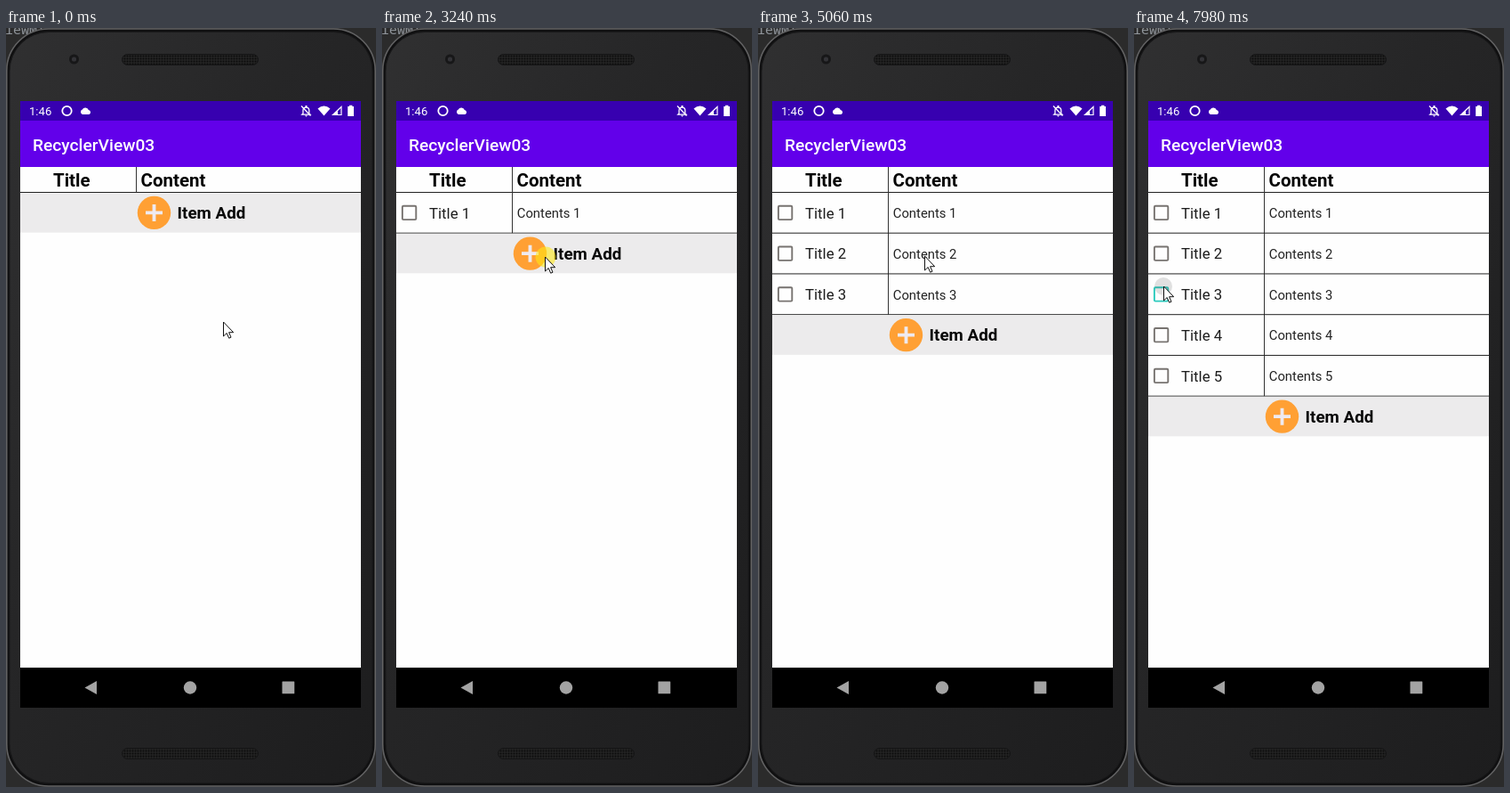
Animation of 416 by 852 pixels, one loop 8000 ms. Source, as an HTML page:

```html
<!DOCTYPE html>
<html lang="en">
<head>
<meta charset="utf-8">
<title>RecyclerView03</title>
<style>
  html, body { margin: 0; width: 100%; height: 100%; overflow: hidden; background: #2b2b2b; }
  svg { display: block; width: 100vw; height: 100vh; font-family: Roboto, sans-serif; }
</style>
</head>
<body>
<svg viewBox="0 0 416 852">
  <defs>
    <linearGradient id="shell" x1="0" y1="0" x2="1" y2="1">
      <stop offset="0" stop-color="#303031"/>
      <stop offset=".4" stop-color="#262627"/>
      <stop offset="1" stop-color="#1d1d1e"/>
    </linearGradient>
    <pattern id="mesh" width="3" height="3" patternUnits="userSpaceOnUse">
      <rect width="3" height="3" fill="#222"/>
      <circle cx="1.5" cy="1.5" r="1" fill="#0c0c0c"/>
    </pattern>
  </defs>

  <rect width="416" height="852" fill="#2b2b2b"/>
  <text x="-1" y="7" font-size="15" fill="#8f949a" font-family="Noto Sans Mono, monospace">iewM:</text>

  <rect x=".8" y="1" width="414.4" height="850" rx="47" fill="#101011" stroke="#626263" stroke-width="1.6"/>
  <rect x="4" y="4.5" width="408" height="843" rx="44" fill="url(#shell)" stroke="#19191a"/>
  <circle cx="76.5" cy="35" r="5.5" fill="#171718"/>
  <circle cx="76.5" cy="35" r="2.6" fill="#333337"/>
  <g fill="url(#mesh)" stroke="#151516">
    <rect x="130.5" y="29.5" width="153" height="12" rx="6"/>
    <rect x="130.5" y="808.5" width="153" height="12" rx="6"/>
  </g>

  <rect x="16" y="82" width="383" height="681" fill="#fefefe"/>
  <rect x="16" y="82" width="383" height="22" fill="#3700b0"/>
  <rect x="16" y="104" width="383" height="52" fill="#6200ea"/>

  <g fill="#fff">
    <text x="26" y="98" font-size="13.1">1:46</text>
    <circle cx="68.5" cy="93" r="5.2" fill="none" stroke="#fff" stroke-width="1.8"/>
    <path d="M86 97a3 3 0 0 1-.2-5.6 3.9 3.9 0 0 1 7 .6 2.6 2.6 0 0 1 .6 5Z"/>
    <path d="M334 96v-3.5a3.4 3.4 0 0 1 6.8 0V96l1.2 1.2h-9.2Z" fill="none" stroke="#fff" stroke-width="1.3"/>
    <path d="M332 87.500l10.500 11" stroke="#fff" stroke-width="1.3"/>
    <path d="M336 98.300h3l-1.500 1.400ZM336.500 87h2v2.500h-2Z"/>
    <path d="M350.500 90.500q7-6 14 0l-7 8Z"/>
    <path d="M377 88.500v9h-9.500Z" fill="none" stroke="#fff" stroke-width="1.2"/>
    <path d="M373 92.500v5.500h-6Z"/>
    <path d="M386 86.700h3.400v1.300h1.600v11h-6.800v-11h1.800Z"/>
    <text x="30" y="137.500" font-size="19.2" font-weight="500">RecyclerView03</text>
  </g>

  <g font-size="20.5" font-weight="700" fill="#050505">
    <text x="53" y="178">Title</text>
    <text x="151.500" y="178">Content</text>
  </g>
  <path d="M16 184.500H399" stroke="#222"/>
  <path id="divider" stroke="#333"/>
  <g id="rows"></g>

  <g id="add">
    <rect x="16" y="185" width="383" height="44.6" fill="#ecebec"/>
    <circle cx="166.500" cy="207.400" r="18.700" fill="#ffa034"/>
    <path d="M157 207.400h19M166.500 197.900v19" stroke="#efeaf0" stroke-width="3.800"/>
    <text x="192.600" y="214.200" font-size="18.800" font-weight="700" fill="#080808">Item Add</text>
  </g>

  <rect x="16" y="718" width="383" height="45"/>
  <g fill="#a3a3a3">
    <path d="M88.500 740.500L102 733v15Z"/>
    <circle cx="207" cy="740.500" r="7.200"/>
    <rect x="310.500" y="733.500" width="13.800" height="13.800" rx=".5"/>
  </g>

  <circle id="press" r="11.500"/>
  <path id="cursor" d="M.5 .5V16.500L4.200 13L6.700 18.700L9 17.700L6.600 12.200H11.700Z" fill="#fff" stroke="#111"/>
</svg>

<script>
  const LOOP = 8000, STEP = 65, PITCH = 45.75;
  const el = id => document.getElementById(id);

  // [start, steps, x, y]: straight moves of the pointer tip
  const home = [244, 330];
  const moves = [
    [730, 5, 147, 322], [1130, 6, 311, 308], [1540, 3, 207, 236], [1740, 4, 173, 213],
    [2550, 8, 183, 257], [3700, 7, 183, 304], [4650, 7, 187, 256], [5130, 1, 187, 243],
    [5260, 6, 180, 349], [5930, 2, 175, 346], [6070, 6, 180, 406],
    [6810, 9, 85, 341], [7430, 7, 33, 290]
  ];
  // [press, row appears]
  const taps = [[2140, 2280], [3240, 3370], [4450, 4580], [5730, 5860], [6610, 6740]];
  const CHECK_AT = 7980;

  el('rows').innerHTML = taps.map((_, i) => `
    <g transform="translate(0 ${i * PITCH})">
      <rect class="box" x="22.900" y="199.700" width="15.400" height="15.400" rx="1.200" fill="none" stroke-width="1.900"/>
      <text x="53" y="213.700" font-size="16.800" fill="#1c1c1c">Title ${i + 1}</text>
      <text x="151.800" y="213" font-size="14.800" fill="#222">Contents ${i + 1}</text>
      <path d="M16 230.200H399" stroke="#222"/>
    </g>`).join('');
  const rows = [...el('rows').children];
  const boxes = rows.map(r => r.querySelector('.box'));

  function pointer(t) {
    let [x, y] = home;
    for (const [start, steps, tx, ty] of moves) {
      if (t < start) break;
      const p = Math.min(steps, Math.floor((t - start) / STEP) + 1) / steps;
      x += (tx - x) * p;
      y += (ty - y) * p;
    }
    return [x, y];
  }

  function draw(t) {
    const count = taps.filter(([, shown]) => t >= shown).length;
    rows.forEach((r, i) => r.setAttribute('visibility', i < count ? 'visible' : 'hidden'));
    el('divider').setAttribute('d', `M146.500 156V${184.5 + count * PITCH}`);
    el('add').setAttribute('transform', `translate(0 ${count * PITCH})`);

    const [x, y] = pointer(t);
    const checking = t >= CHECK_AT;
    const tapping = taps.some(([down, shown]) => t >= down && t < shown);
    boxes.forEach((b, i) => b.setAttribute('stroke', checking && i === 2 ? '#2bcabd' : '#777370'));

    const press = el('press');
    press.setAttribute('visibility', tapping || checking ? 'visible' : 'hidden');
    press.setAttribute('cx', x + (checking ? 0 : 1));
    press.setAttribute('cy', y);
    press.setAttribute('r', checking ? 10 : 11.5);
    press.setAttribute('fill', checking ? 'rgba(90,90,90,.18)' : 'rgba(255,232,20,.58)');
    el('cursor').setAttribute('transform', `translate(${x} ${y - .5})`);
  }

  const begin = performance.now();
  function tick() {
    draw((performance.now() - begin) % LOOP);
    requestAnimationFrame(tick);
  }
  tick();
</script>
</body>
</html>
```
